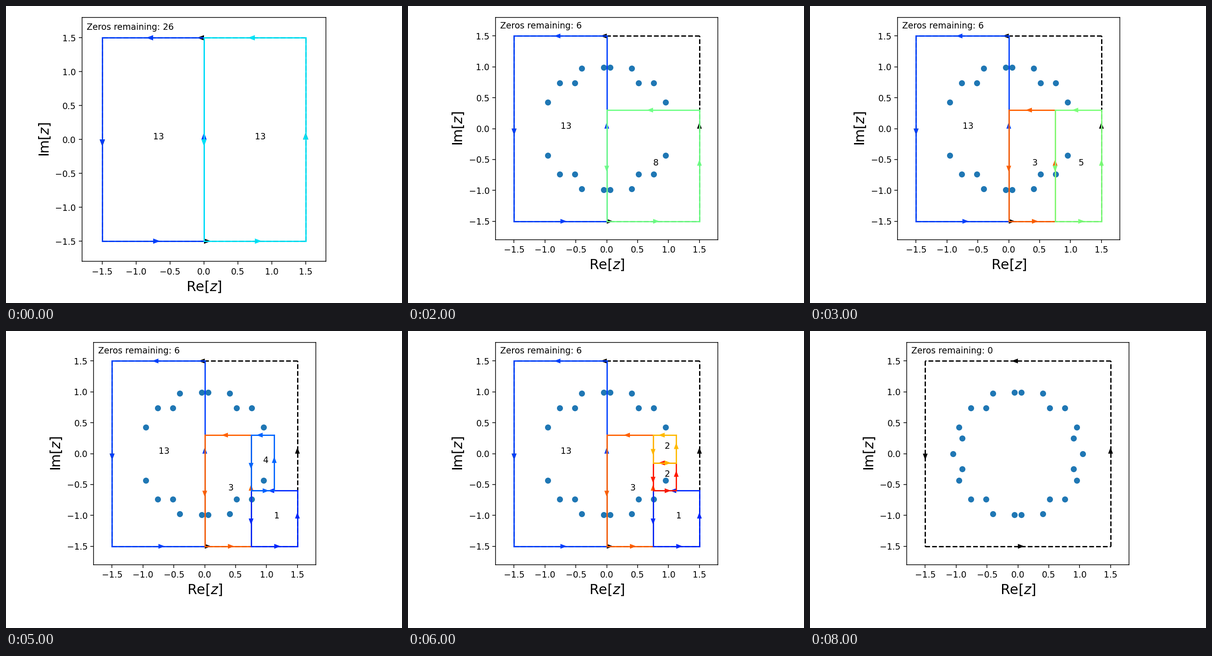
A matplotlib script that plays this animation: 864 px wide and 648 px high, repeating every 9 s.

```python
import matplotlib.pyplot as plt
from matplotlib.animation import FuncAnimation

W, H, DPI = 864, 648, 135
plt.rcParams["font.family"] = "DejaVu Sans"
fig = plt.figure(figsize=(W / DPI, H / DPI), dpi=DPI, facecolor="white")
ax = fig.add_axes([0.2, 0.2, 0.6, 0.6])


def mirror(points):
    return [(sx * x, sy * y) for x, y in points for sx in (1, -1) for sy in (1, -1)]


EARLY = mirror([(0.053, 0.989), (0.404, 0.974), (0.517, 0.739),
                (0.761, 0.739), (0.953, 0.43)])
LATE = mirror([(0.9, 0.248)]) + [(1.05, 0), (-1.05, 0)]

# Boxes: x0, x1, y0, y1, zeros inside, colour
LEFT = (-1.5, 0, -1.5, 1.5, 13, "#0040ff")
RIGHT = (0, 1.5, -1.5, 1.5, 13, "#00e4f8")
LOWER = (0, 1.5, -1.5, 0.3, 8, "#70ff87")
UPPER = (0, 1.5, 0.3, 1.5, 5, "#0020ff")
THREE = (0, 0.75, -1.5, 0.3, 3, "#ff6000")
FIVE = (0.75, 1.5, -1.5, 0.3, 5, "#7dff7a")
ONE = (0.75, 1.5, -1.5, -0.6, 1, "#0028ff")
FOUR_WIDE = (0.75, 1.5, -0.6, 0.3, 4, "#00b0ff")
FOUR = (0.75, 1.125, -0.6, 0.3, 4, "#0064ff")
TWO_LOW = (0.75, 1.125, -0.6, -0.15, 2, "#ff1a00")
TWO_HIGH = (0.75, 1.125, -0.15, 0.3, 2, "#ffb900")

STEPS = [
    ([LEFT, RIGHT], []),
    ([LEFT, LOWER, UPPER], []),
    ([LEFT, LOWER], EARLY),
    ([LEFT, THREE, FIVE], EARLY),
    ([LEFT, THREE, ONE, FOUR_WIDE], EARLY),
    ([LEFT, THREE, ONE, FOUR], EARLY),
    ([LEFT, THREE, ONE, TWO_LOW, TWO_HIGH], EARLY),
    ([LEFT, THREE, ONE, TWO_LOW], EARLY + LATE),
    ([], EARLY + LATE),
]


def place_axes(step):
    """Square axes; left edge and side in pixels, top edge fixed."""
    left, side = 191.05, 485.2
    if step == 0:
        left, side = 165.8, 532.4
    elif step == len(STEPS) - 1:
        left = 211.0
    ax.set_position([left / W, 1 - (25 + side) / H, side / W, side / H])


def draw_contour(x0, x1, y0, y1, color, style="-"):
    corners = [(x0, y0), (x1, y0), (x1, y1), (x0, y1)]
    for (xa, ya), (xb, yb) in zip(corners, corners[1:] + corners[:1]):
        ax.plot([xa, xb], [ya, yb], color=color, ls=style, lw=1.5)
        ax.arrow((xa + xb) / 2, (ya + yb) / 2,
                 1e-6 * (xb - xa), 1e-6 * (yb - ya), width=1e-6,
                 head_width=0.078, head_length=0.103, color=color, lw=0)


def update(step):
    boxes, zeros = STEPS[step]
    ax.clear()
    place_axes(step)
    draw_contour(-1.5, 1.5, -1.5, 1.5, "black", "--")
    for x0, x1, y0, y1, count, color in boxes:
        draw_contour(x0, x1, y0, y1, color)
        ax.text((x0 + x1) / 2, (y0 + y1) / 2, str(count))
    if zeros:
        ax.scatter(*zip(*zeros), color="C0")
    ax.text(0.02, 0.95, f"Zeros remaining: {26 - len(zeros)}",
            transform=ax.transAxes)
    ticks = [k / 2 for k in range(-3, 4)]
    ax.set(xlim=(-1.8, 1.8), ylim=(-1.8, 1.8), xticks=ticks, yticks=ticks)
    ax.set_xlabel("Re[$z$]", size=16)
    ax.set_ylabel("Im[$z$]", size=16)
    return []


anim = FuncAnimation(fig, update, frames=len(STEPS), interval=1000,
                     init_func=lambda: [], repeat=True, repeat_delay=0)
plt.show()
```
